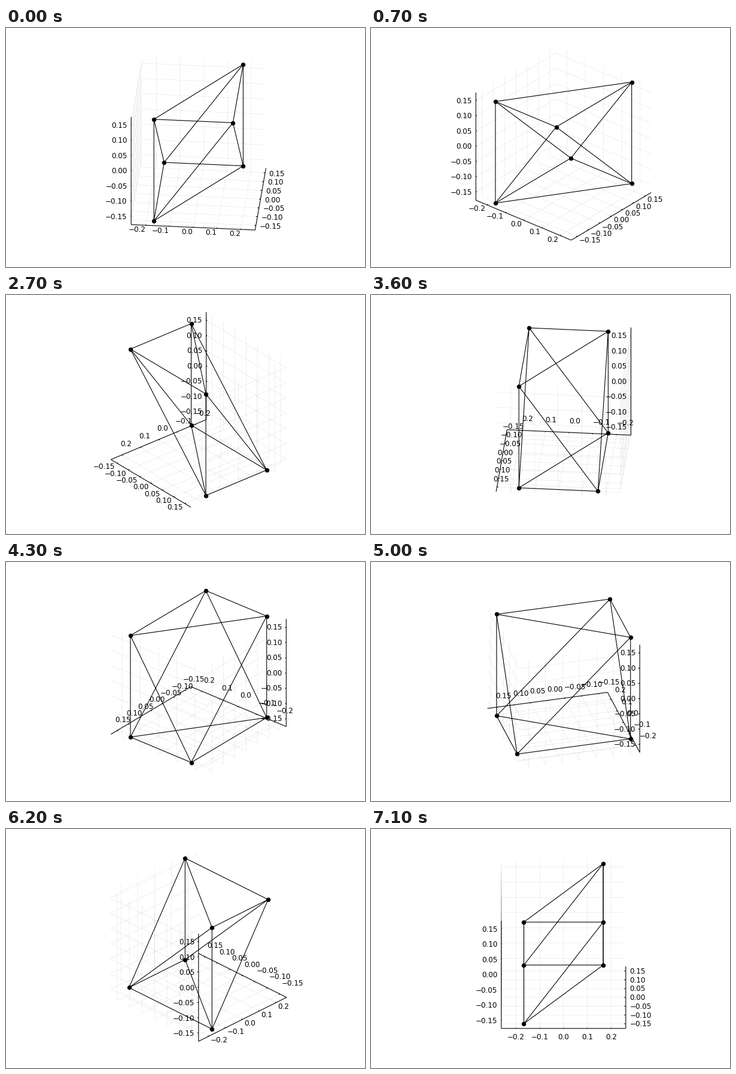
Recreate the animation shown at these times as a matplotlib script. Size 600x400 px, loop 7200 ms.

```python
import math
from itertools import combinations

import numpy as np
import matplotlib.pyplot as plt
from matplotlib.animation import FuncAnimation
from matplotlib.collections import LineCollection

W, H, DPI = 600, 400, 100
FRAMES, INTERVAL = 72, 100
PX = 72 / DPI                       # points per pixel
CX, CY, HALF = 321.8, 191.75, 104   # centre and half edge of the box
ELEV = math.radians(30)
LIMITS = np.array([0.2614, 0.53 / 3, 0.53 / 3])
GAP = 6.6                           # from axis to label
FONT = 12

TICKS = [np.linspace(-0.2, 0.2, 5),
         np.linspace(-0.15, 0.15, 7),
         np.linspace(-0.15, 0.15, 7)]
DIGITS = [1, 2, 2]

# For each axis: (near axis, its start side), (far axis, its start side)
LAYOUT = [((1, -1), (2, -1)),
          ((0, 1), (2, -1)),
          ((1, -1), (0, -1))]

# Cube corners without one opposite pair; antipodes are not joined
NODES = np.array([(-1, -1, 1), (-1, 1, -1), (-1, -1, -1),
                  (1, 1, 1), (1, -1, 1), (1, 1, -1)]) / 6
PAIRS = [(a, b) for a, b in combinations(range(6), 2)
         if not np.allclose(NODES[a], -NODES[b])]


def number(value, digits):
    text = f"{abs(value):.{digits}f}"
    return "\u2212" + text if value < -1e-9 else text


def project(points, azimuth):
    """Map box coordinates in [-1, 1] to pixels."""
    x, y, z = np.moveaxis(np.asarray(points, float) * HALF, -1, 0)
    c, s = math.cos(azimuth), math.sin(azimuth)
    depth = y * c - x * s
    up = z * math.cos(ELEV) + depth * math.sin(ELEV)
    return np.stack([CX + x * c + y * s, CY - up], axis=-1)


def spot(axis, value, near, far):
    """Box point on an axis, given its near and far coordinates."""
    point = [0.0] * 3
    point[axis] = value
    point[LAYOUT[axis][0][0]] = near
    point[LAYOUT[axis][1][0]] = far
    return point


grid, frame_lines, tick_lines = [], [], []
for k in range(3):
    n, f = LAYOUT[k][0][1], LAYOUT[k][1][1]
    frame_lines.append([spot(k, -1, n, f), spot(k, 1, n, f)])
    for t in TICKS[k] / LIMITS[k]:
        grid.append([spot(k, t, n, f), spot(k, t, -n, f), spot(k, t, -n, -f)])
        tick_lines.append([spot(k, t, n, f), spot(k, t, n * 0.976, f)])

fig = plt.figure(figsize=(W / DPI, H / DPI), dpi=DPI, facecolor="white")
ax = fig.add_axes([0, 0, 1, 1])
ax.set_xlim(0, W)
ax.set_ylim(H, 0)
ax.axis("off")


def lines(width, order, alpha=1):
    group = LineCollection([], colors=[(0, 0, 0, alpha)], snap=False,
                           linewidths=width * PX, zorder=order)
    ax.add_collection(group, autolim=False)
    return group


grid_art = lines(0.6, 1, 0.1)
axis_art = lines(1.1, 2)
tick_art = lines(1.1, 2)
edge_art = lines(1.1, 4)
node_art, = ax.plot([], [], "o", color="black", ms=7.4 * PX, mew=0,
                    snap=False, zorder=5)
labels = [[ax.text(0, 0, number(t, DIGITS[k]), fontsize=FONT * PX,
                   family="DejaVu Sans", va="baseline", zorder=3)
           for t in TICKS[k]] for k in range(3)]


def label_style(k, azimuth):
    """Offset and horizontal alignment of the labels on axis k."""
    if k == 2:
        return -GAP, 0, "right"
    (x0, y0), (x1, y1) = project(frame_lines[k], azimuth)
    phi = round(math.degrees(math.atan2(y0 - y1, x1 - x0)) - 90, 4) % 360
    dx = GAP * math.cos(math.radians(phi))
    dy = -GAP * math.sin(math.radians(phi))
    if phi in (90, 270):
        return 0, dy + math.copysign(7.2, dy), "center"
    if 0 < phi < 180:
        dy -= 12.8
    return dx, dy, "right" if 180 <= phi < 270 else "left"


def draw(i):
    azimuth = math.radians(5 * (i + 1))
    grid_art.set_segments(project(grid, azimuth))
    axis_art.set_segments(project(frame_lines, azimuth))
    tick_art.set_segments(project(tick_lines, azimuth))

    nodes = project(NODES / LIMITS, azimuth)
    edge_art.set_segments([nodes[[a, b]] for a, b in PAIRS])
    node_art.set_data(nodes[:, 0], nodes[:, 1])

    for k in range(3):
        n, f = LAYOUT[k][0][1], LAYOUT[k][1][1]
        dx, dy, align = label_style(k, azimuth)
        for t, label in zip(TICKS[k] / LIMITS[k], labels[k]):
            x, y = project(spot(k, t, n, f), azimuth)
            label.set_position((x + dx, y + dy + 0.36 * FONT))
            label.set_ha(align)
    return []


anim = FuncAnimation(fig, draw, frames=FRAMES, interval=INTERVAL,
                     repeat=True, repeat_delay=0, blit=False)
plt.show()
```
